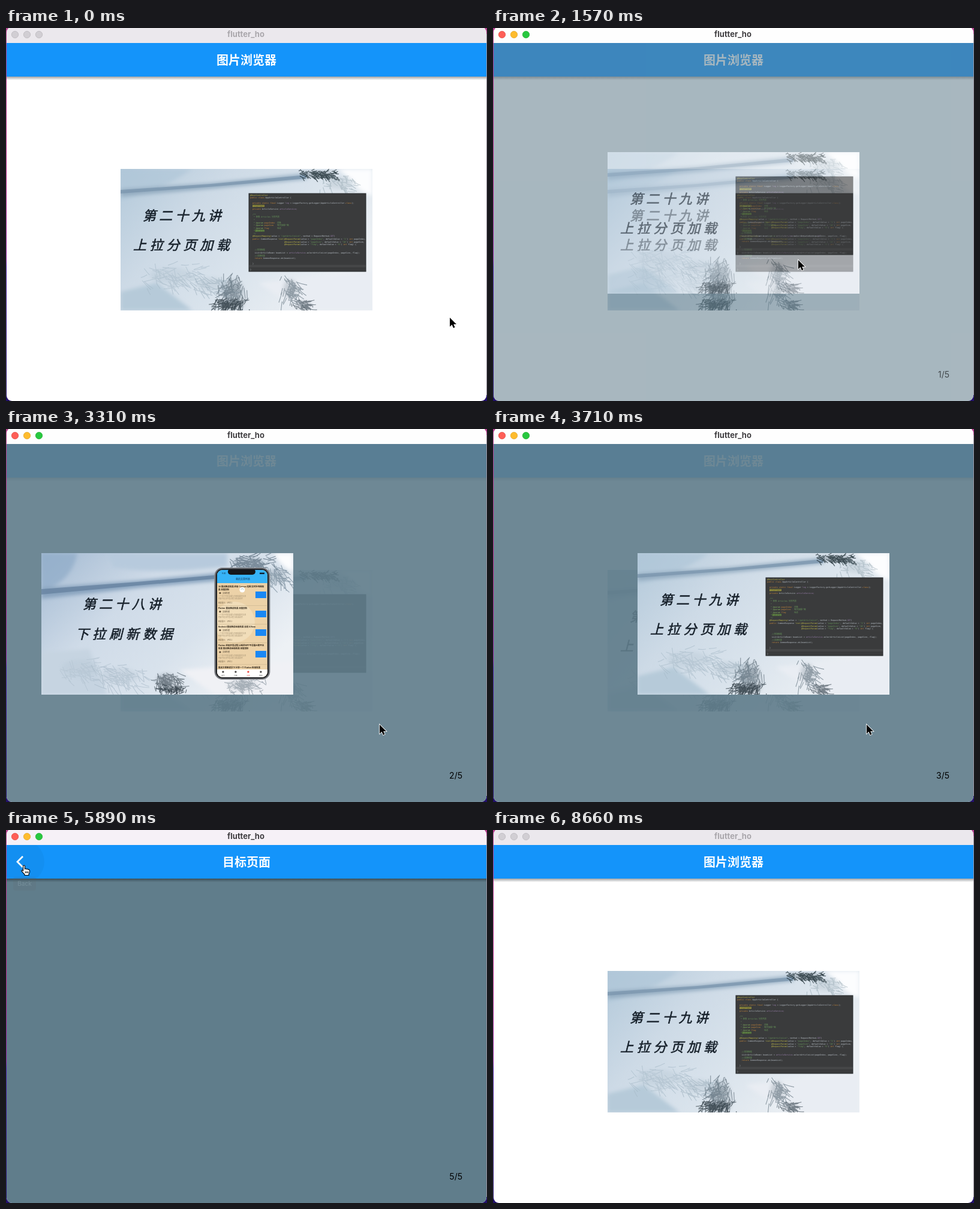
Recreate the animation shown at these times as an HTML page. Size 802 by 622 pixels, loop 8760 ms.

```html
<!DOCTYPE html>
<html lang="zh-CN">
<head>
<meta charset="utf-8">
<style>
html,body{margin:0;width:100%;height:100%;overflow:hidden;background:#fff}
svg{display:block;width:802px;height:622px}
text{white-space:pre}
.cjk{font-family:'Noto Sans CJK SC','Noto Sans CJK',sans-serif}
.ui{font-family:Inter,'Noto Sans',sans-serif}
.code{font-family:'DejaVu Sans Mono','Noto Sans CJK SC',monospace}
.brush{font-size:22px;font-style:italic;fill:#18222c;stroke:#18222c;stroke-width:.6}
.bar{font-size:20px;font-weight:600;fill:#fff;text-anchor:middle}
</style>
</head>
<body>
<svg id="stage" viewBox="0 0 802 622" xmlns="http://www.w3.org/2000/svg"></svg>
<script>
const LOOP = 8760, PAGE = 801;
const BLUE = '#1494fa', SLATE = '#607d8b';

let seed = 7;
const rnd = () => (seed = seed * 16807 % 2147483647) / 2147483647;
const clamp = v => Math.max(0, Math.min(1, v));
const prog = (t, a, b) => clamp((t - a) / (b - a));

const rect = (x, y, w, h, fill, more = '') =>
  `<rect x="${x}" y="${y}" width="${w}" height="${h}" fill="${fill}" ${more}/>`;
const tiny = (x, y, size, s, more) =>
  `<text transform="translate(${x} ${y}) scale(${size / 10})" font-size="10" ${more}>${s}</text>`;

// A blurred clump with fine needles leaning along one angle
function pine(cx, cy, w, h, n, color, alpha, len, angle) {
  let d = '';
  for (let i = 0; i < n; i++) {
    const x = cx + (rnd() + rnd() - 1) * w, y = cy + (rnd() + rnd() - 1) * h;
    const a = angle + (rnd() - .5) * 1.9, l = len * (.4 + rnd() * .6);
    const dx = Math.cos(a) * l, dy = Math.sin(a) * l;
    d += `M${x.toFixed(1)} ${y.toFixed(1)}q${(dx * .5).toFixed(1)} ${(dy * .5 + 1).toFixed(1)} ${dx.toFixed(1)} ${dy.toFixed(1)}`;
  }
  return `<g opacity="${alpha}"><ellipse cx="${cx}" cy="${cy}" rx="${w * .6}" ry="${h * .6}" fill="${color}" opacity=".4" filter="url(#soft)"/>
  <path d="${d}" fill="none" stroke="${color}" stroke-width="1.1" filter="url(#fine)"/></g>`;
}

function codePanel() {
  const ink = { y: '#c8c04a', o: '#cc8a3c', w: '#c4ccd4', p: '#a487b8', g: '#6a9a5c', G: '#86b860' };
  const param = (v, type, name, end) => `y@RequestParam(|wvalue = |g"${name}"|w, defaultValue = |g"${v}"|w) |o${type} |w${name}${end}`;
  const pad = ' '.repeat(29);
  const rows = {
    0: 'y@RestController',
    1: 'opublic class |wAppArticleController {',
    3: 'o  private static final |wLogger |plog |w= LoggerFactory.getLogger(AppArticleController.|oclass|w);',
    4: 'y  @Autowired',
    5: 'o  private |wArticleService |particleService;',
    7: 'g  /**',
    8: 'g   * 获取 Articles 分页列表',
    9: 'g   *',
    10: 'g   * |G@param |opageIndex |g 页数',
    11: 'g   * |G@param |opageSize  |g 每页加载个数',
    12: 'g   * |G@param |oflag      |g 标志',
    13: 'g   * |G@return',
    14: 'g   */',
    15: 'y  @RequestMapping(|wvalue = |g"/getArticleList"|w, method = RequestMethod.|pGET|w)',
    16: 'o  public |wCommonResponse |ylist(|' + param(1, 'int', 'pageIndex', ','),
    17: 'w' + pad + '|' + param(10, 'int', 'pageSize', ','),
    18: 'w' + pad + '|' + param(0, 'int', 'flag', ') {'),
    20: 'g    //查询数据',
    21: 'w    List&lt;ArticleBean&gt; beanList = |particleService|w.selectArticleList(pageIndex, pageSize, flag);',
    22: 'g    //返回结果',
    23: 'o    return |wCommonResponse.ok(beanList);',
    25: 'w  }',
    27: 'w}'
  };
  let s = rect(214, 41, 195, 130, '#3a3b3c', 'stroke="#272a2d"') + rect(214.5, 160, 194, 4, '#454647') +
    rect(220, 59.5, 20, 4, '#6c6a35') + rect(224, 101, 16, 4, '#4a6238');
  for (const k in rows) {
    const spans = rows[k].split('|').map(p => `<tspan fill="${ink[p[0]]}">${p.slice(1)}</tspan>`).join('');
    s += tiny(216, 44.6 + k * 4.59, 3.27, spans, 'class="code"');
  }
  return s;
}

function phone() {
  const items = [
    [56.5, 64, '16 重启解读效果 应用 Canvas 绘图 实时折线图效', '果 深度剖析'],
    [92.5, 96, 'Flutter 重启解读效果 深度剖析'],
    [123.5, 127, 'Android 重启解读动画效果 自定义View'],
    [155, 163, 'Flutter 应用开发过程 让新的APP平滑展示跨平台', '效果 重启解读动画效果 深度剖析'],
    [192, 0, '重启文章解读学习 分享一个 Flutter 应用效果']
  ];
  const small = (x, y, size, s, fill, more = '') => tiny(x, y, size, s, `class="cjk" fill="${fill}" ${more}`);
  let s = rect(289, 24.5, 92, 186, '#5b5d62', 'rx="13" stroke="#94979c" stroke-width="1.2"') +
    rect(291.4, 26.6, 87.2, 181.8, '#15171a', 'rx="11"') +
    '<g clip-path="url(#screen)">' + rect(293, 28, 84, 179, '#ecd2a8') +
    '<circle cx="322" cy="115" r="34" fill="#f6e4c5" opacity=".6"/>' +
    rect(293, 28, 84, 22, '#36b3f8') + rect(311, 26, 46, 10, '#15171a', 'rx="5"') +
    small(301, 35, 3.4, '9:30', '#123') + rect(364, 32.5, 8, 2.5, '#123') +
    small(324, 45, 4, '我的文章列表', '#173247');
  for (const [y, by, a, b] of items) {
    s += small(295, y, 3.5, a, '#2b2115', 'font-weight="700"');
    if (!by) continue;
    let v = y;
    if (b) s += small(295, v += 5, 3.5, b, '#2b2115', 'font-weight="700"');
    s += `<circle cx="298" cy="${v + 5}" r="1.6" fill="#5a4a36"/>` + small(302, v + 6.2, 3, '文章作者', '#3a2f22') +
      small(295, v + 11.5, 2.9, '一个关于列表加载与页面效果的文章', '#a08e70') +
      small(295, v + 15.5, 2.9, '内容中记录开发过程与效果说明', '#a08e70') +
      small(295, v + 22, 2.9, '阅读量 8 ｜ 评论 2', '#6b5b42') +
      rect(293, v + 25.5, 84, .6, '#c9b48e') + rect(357, by, 18, 11, '#1a88f4');
  }
  s += '<circle cx="335" cy="61" r="4.5" fill="#fff"/><path d="M333 61a2 2 0 0 1 4 0" fill="none" stroke="#8bb" stroke-width=".7"/>' +
    rect(293, 194, 84, 13, '#fff');
  ['首页', '分类', '文章', '我的'].forEach((n, i) => {
    const x = 303 + i * 21, c = i == 2 ? '#ee4b45' : '#444';
    s += rect(x - 1.5, 196.5, 3, 3, c, 'rx="1"') + small(x - 2.6, 204.5, 2.6, n, c);
  });
  return s + '</g>';
}

const brush = (x, y, gap, s) => `<text class="cjk brush" x="${x}" y="${y}" letter-spacing="${gap}">${s}</text>`;

const picA = '<g clip-path="url(#frame)">' + rect(0, 0, 420, 236, 'url(#sky)') +
  `<g filter="url(#soft)"><path d="M0 0H120Q60 40 0 52Z" fill="#aec5d8" opacity=".6"/>
  <path d="M0 34L150 24L310 8V17L160 32L0 46Z" fill="#93abc0"/>
  <path d="M0 205L60 190L120 236H0Z" fill="#b6cad9"/><path d="M230 190L420 170V236H300Z" fill="#e9edf3"/>
  <path d="M362 0H420V45Q394 36 388 20Z" fill="#fcfdfe"/></g>
  <path d="M0 35L150 25L310 10V16L160 29L0 41Z" fill="#7691aa" opacity=".65" filter="url(#fine)"/>` +
  pine(330, 9, 40, 7, 110, '#26363d', .85, 11, .2) + pine(365, 24, 34, 16, 50, '#8b9fa9', .5, 14, .9) +
  pine(85, 178, 60, 22, 85, '#a2b6c4', .55, 24, .5) + pine(150, 192, 40, 18, 50, '#8fa4b2', .5, 24, .7) +
  pine(188, 205, 28, 34, 120, '#4a5b67', .6, 20, 2) + pine(186, 225, 32, 12, 110, '#26333b', .75, 13, 2.4) +
  pine(283, 200, 18, 26, 70, '#566874', .6, 18, 1.2) + pine(304, 227, 20, 10, 60, '#3c4a54', .65, 12, .6) +
  brush(37, 86, 5.2, '第二十九讲') + brush(21, 134.5, 5.8, '上拉分页加载') + codePanel() + '</g>';

const picB = '<g clip-path="url(#frame)">' + rect(0, 0, 420, 236, 'url(#sky2)') +
  `<g filter="url(#soft)"><path d="M0 0H60Q50 50 0 62Z" fill="#8fabc8" opacity=".7"/>
  <path d="M110 0H310V22Q200 36 120 24Z" fill="#b7cadd"/>
  <path d="M0 58L160 46L310 32V45L160 58L0 76Z" fill="#88a3be"/>
  <path d="M0 165L80 160L110 236H0Z" fill="#c6d4e1"/><path d="M230 195L420 180V236H290Z" fill="#f0f1f5"/>
  <path d="M388 0H420V30Q400 24 388 0Z" fill="#fcfdfe"/></g>
  <path d="M0 60L160 48L310 35V41L160 54L0 69Z" fill="#65819f" opacity=".75" filter="url(#fine)"/>` +
  pine(345, 17, 44, 16, 130, '#4a5f70', .65, 18, .4) + pine(390, 38, 30, 20, 65, '#5d7486', .6, 20, .8) +
  pine(65, 192, 52, 24, 60, '#aebfcd', .55, 24, .5) + pine(130, 205, 54, 22, 70, '#a2b4c3', .55, 26, .6) +
  pine(208, 212, 26, 18, 75, '#3d4a54', .65, 22, .8) + pine(222, 226, 24, 8, 50, '#222e37', .7, 13, 2.6) +
  pine(335, 220, 40, 14, 80, '#76848f', .6, 16, .4) +
  brush(69, 93, 5.2, '第二十八讲') + brush(57, 143, 6, '下拉刷新数据') + phone() + '</g>';

const appBar = title => rect(1, 81, 800, 6, 'url(#shade)') + rect(1, 25, 800, 56, BLUE) +
  `<text class="cjk bar" x="401" y="60.5">${title}</text>`;
const stop = (o, c, a = 1) => `<stop offset="${o}" stop-color="${c}" stop-opacity="${a}"/>`;

document.getElementById('stage').innerHTML = `<defs>
<linearGradient id="desk" x2="0" y2="1">${stop(0, '#b0408c')}${stop(.4, '#b01c82')}${stop(.62, '#8a1c9c')}${stop(.64, '#4a1ca4')}${stop(1, '#22106a')}</linearGradient>
<linearGradient id="shade" x2="0" y2="1">${stop(0, '#000', .36)}${stop(1, '#000', 0)}</linearGradient>
<linearGradient id="sky" x2="1" y2=".5">${stop(0, '#b3c9da')}${stop(.35, '#cddae6')}${stop(.65, '#d9e3ec')}${stop(1, '#ecf0f4')}</linearGradient>
<linearGradient id="sky2" x2="1" y2=".6">${stop(0, '#a3bad2')}${stop(.4, '#cfdbe8')}${stop(.7, '#d8e2ec')}${stop(1, '#edf1f5')}</linearGradient>
<filter id="soft" x="-30%" y="-30%" width="160%" height="160%"><feGaussianBlur stdDeviation="3"/></filter>
<filter id="fine"><feGaussianBlur stdDeviation=".6"/></filter>
<clipPath id="frame">${rect(0, 0, 420, 236, '#000')}</clipPath>
<clipPath id="screen">${rect(293, 28, 84, 179, '#000', 'rx="9"')}</clipPath>
<clipPath id="win">${rect(1, -2, 800, 624, '#000', 'rx="9"')}</clipPath>
<clipPath id="barClip">${rect(1, 25, 800, 56, '#000')}</clipPath>
<g id="picA">${picA}</g><g id="picB">${picB}</g></defs>
${rect(0, 0, 802, 622, 'url(#desk)')}${rect(801, 10, 1, 602, '#948c99')}
<g clip-path="url(#win)">
${rect(1, 25, 800, 597, '#fff')}${appBar('图片浏览器')}
<use href="#picA" x="191" y="235"/>
<g id="detail">${rect(1, 25, 800, 597, SLATE, 'opacity=".91"')}
${[0, 1, 2, 3].map(i => `<use class="page" href="#pic${i % 2 ? 'B' : 'A'}" y="207"/>`).join('')}</g>
<g id="target">${rect(1, 25, 800, 597, SLATE)}${appBar('目标页面')}
<g clip-path="url(#barClip)"><circle id="hover" cx="28" cy="53" r="36" fill="#000"/><circle id="splash" cx="28" cy="53" fill="#fff"/></g>
<path d="M28 44L19 53L28 62" fill="none" stroke="#fff" stroke-width="2.8"/>
<g id="tip">${rect(12, 78, 38, 23, '#616161', 'rx="4" opacity=".9"')}<text class="ui" x="31" y="93" font-size="10" fill="#fff" text-anchor="middle">Back</text></g></g>
<text id="count" class="ui" x="761" y="583" font-size="14" text-anchor="end"></text>
<rect id="top" x="1" y="-2" width="800" height="27"/>
${[15, 35, 55].map(x => `<circle class="light" cx="${x}" cy="11" r="5.7" stroke-width=".7"/>`).join('')}
<text id="name" class="ui" x="400" y="15" font-size="13" font-weight="700" text-anchor="middle">flutter_ho</text>
</g>
<path id="arrow" d="M0 0V15L3.5 11.8L6 17.2L8.5 16.1L6.2 10.9H11Z" stroke="#fff" stroke-width="1.6" paint-order="stroke"/>
<path id="hand" d="M-1.4 9V1.4Q-1.4 0 0 0T1.4 1.4V6Q3 4.8 4.2 6.4Q6 5.4 7 7Q9 6.6 9.4 8.5V11Q9 13 8 14.5V16.5H1V15Q-1 13-4 9.6Q-4.4 7.6-2.6 8ZM2.4 10V13M4.6 10V13M6.8 10V13" fill="#fff" stroke="#000" stroke-width="1.1"/>`;

const $ = id => document.getElementById(id);
const set = (el, o) => { for (const k in o) el.setAttribute(k, o[k]); };
const pages = document.querySelectorAll('.page'), lights = document.querySelectorAll('.light');

// Screen refreshes come in bursts: first, last, count
const bursts = [
  [0, 90, 2], [90, 210, 2], [510, 1030, 10], [1390, 1970, 11], [2210, 2550, 7], [3020, 3880, 16],
  [3940, 4470, 10], [5190, 6010, 14], [6130, 6140, 2], [6310, 6770, 8], [7070, 7860, 14],
  [8100, 8280, 4], [8660, LOOP, 2]
];
function hold(t) {
  const [a, b, n] = bursts.findLast(u => u[0] <= t), step = (b - a) / (n - 1);
  return t >= b ? b : a + Math.floor((t - a) / step) * step;
}

// time, x, y
const path = [
  [0, 740, 483], [510, 740, 483], [850, 454, 354], [1030, 509, 387], [1690, 509, 387],
  [1970, 563, 580], [2210, 563, 580], [2550, 623, 493], [5190, 623, 493], [5680, 54, 8],
  [5880, 30, 59], [6010, 28, 56], [6129, 28, 56], [6130, 22, 55], [6310, 22, 55], [6400, 22, 51],
  [7500, 22, 51], [7860, 616, 558], [8100, 616, 558], [8280, 772, 623], [LOOP + 1, 772, 623]
];
function pointer(t) {
  const i = path.findIndex(p => p[0] > t), a = path[i - 1], b = path[i];
  const u = prog(t, a[0], b[0]), e = u * u * (3 - 2 * u);
  return [a[1] + (b[1] - a[1]) * e, a[2] + (b[2] - a[2]) * e];
}

function scrollPos(t) {
  const fling = (a, b, pow) => 2 * (1 - Math.pow(1 - prog(t, a, b), pow));
  return fling(3020, 3880, 2.154) + fling(3940, 4470, 1.438);
}

function draw(now) {
  const t = hold(now), pos = scrollPos(t), show = prog(t, 1384, 1684);
  const active = t >= 90 && t < 8660;

  $('top').setAttribute('fill', active ? (t < 5190 ? '#fefefe' : '#f6f1f7') : '#ebe8ed');
  $('name').setAttribute('fill', active ? '#3f3d40' : '#a9a6ab');
  lights.forEach((l, i) => set(l, active
    ? { fill: ['#fe5f57', '#febc2e', '#28c840'][i], stroke: ['#e0443e', '#dea123', '#1aab29'][i] }
    : { fill: '#d1ced3', stroke: '#b8b5ba' }));

  set($('detail'), { opacity: show, display: show > 0 && t < 4470 ? 'inline' : 'none' });
  pages.forEach((p, i) => p.setAttribute('x', 191 + (i - pos) * PAGE));
  $('count').textContent = Math.round(pos) + 1 + '/5';
  $('count').setAttribute('opacity', show * (1 - prog(t, 6470, 6770)));

  set($('target'), {
    transform: `translate(${(4 - pos) * PAGE} 0)`,
    opacity: 1 - prog(t, 7193, 7493),
    display: pos > 3 && t < 7493 ? 'inline' : 'none'
  });
  $('hover').setAttribute('opacity', t > 5870 && t < 6310 ? .035 : 0);
  const press = t < 7070 ? 6310 : 7070;
  set($('splash'), {
    r: 36 * prog(t, press, press + 160),
    opacity: .12 * (t < 7070 ? 1 - prog(t, 6600, 6770) : 1)
  });
  $('tip').setAttribute('opacity', prog(t, 5865, 6010) * (1 - prog(t, 6310, 6390)));

  const [x, y] = pointer(t), hand = t >= 5860 && t < 6130, at = `translate(${x} ${y})`;
  set($('arrow'), { transform: at, display: hand || t >= 8280 ? 'none' : 'inline' });
  set($('hand'), { transform: at, display: hand ? 'inline' : 'none' });
}

const start = performance.now();
function tick(now) {
  draw(Math.max(0, now - start) % LOOP);
  requestAnimationFrame(tick);
}
draw(0);
requestAnimationFrame(tick);
</script>
</body>
</html>
```
